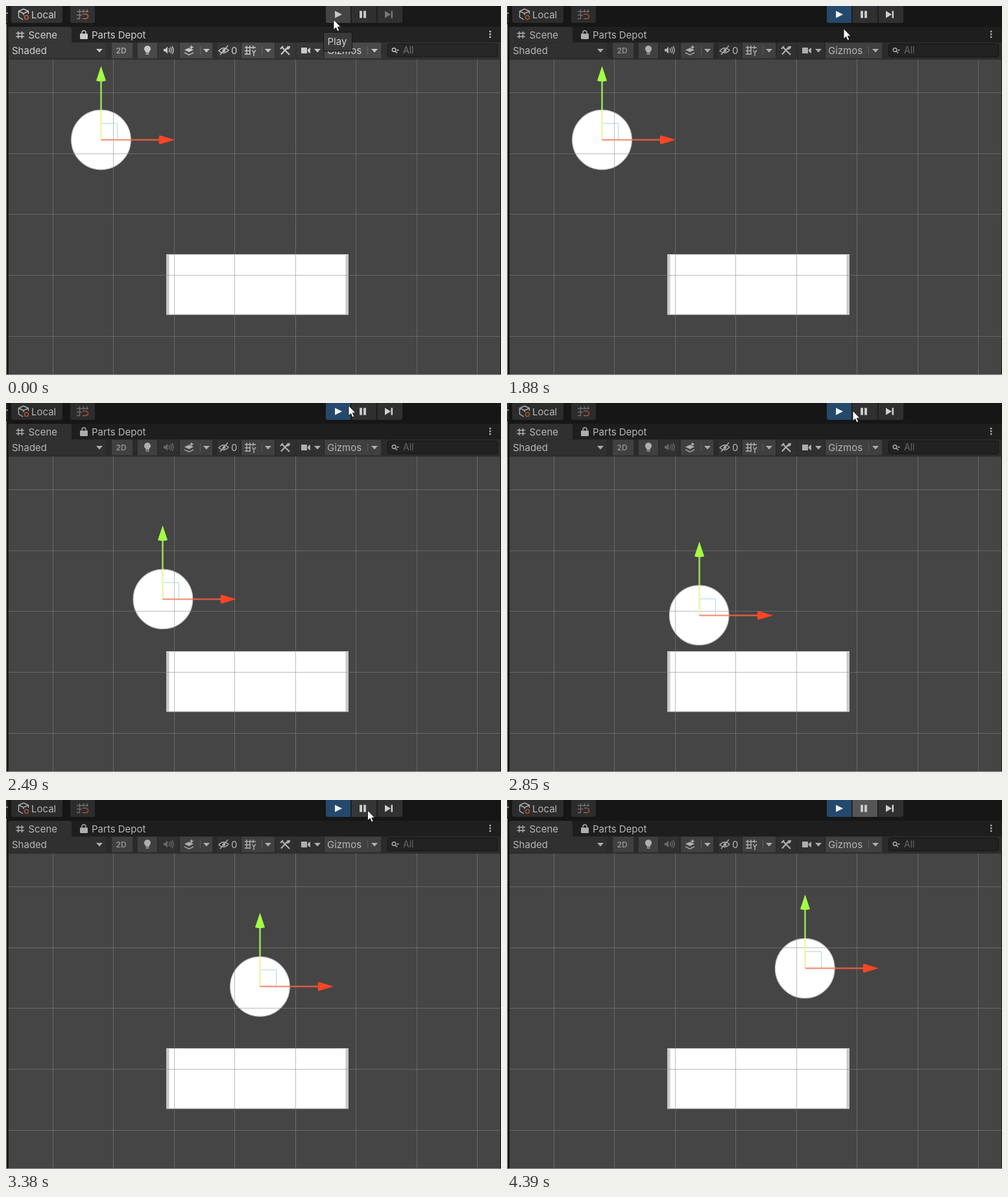
Animation of 763 by 568 pixels, one loop 4850 ms. Source, as an HTML page:

```html
<!DOCTYPE html>
<html lang="en">
<head>
<meta charset="utf-8">
<title>Bouncing ball in a scene editor</title>
<style>
html, body { margin: 0; width: 100%; height: 100%; overflow: hidden; background: #191919; }
svg { display: block; width: 763px; height: 568px; font: 15px Inter, sans-serif; }
text { fill: #d0d0d0; }
.icon { fill: #c8c8c8; }
.line { fill: none; stroke: #c8c8c8; stroke-width: 1.4; }
.bold { stroke-width: 2.2; }
.orange { fill: none; stroke: #c4603c; stroke-width: 1.5; }
.button { fill: #323232; }
.cells { fill: none; stroke-width: 24; }
.shaft { fill: none; stroke-width: 2.6; }
.grid { fill: none; stroke: #858585; stroke-opacity: .55; }
</style>
</head>
<body>
<svg viewBox="0 0 763 568">
  <rect width="763" height="568" fill="#191919"/>

  <g id="toolbar">
    <path d="M0 0H2V26H0Z" fill="#373737"/>
    <path class="line" d="M0 11h3"/>
    <rect class="button" x="8" y="-5" width="79" height="31" rx="3"/>
    <path class="line" d="M27 4.5L34.5 8V12M27 4.5L19.5 8V17L26 21M19.5 8L27 11.5L34.5 8M27 11.5V14"/>
    <circle class="orange" cx="31.5" cy="17.5" r="3"/>
    <text x="39" y="18.5">Local</text>
    <rect class="button" x="99" y="-5" width="38" height="31" rx="3"/>
    <path class="line" opacity=".5" d="M113.5 5V20M119.5 5V10M125 5V10M109 8.5H127M109 14H117M109 19.5H114"/>
    <path class="orange" d="M118 12.5H123a3.3 3.3 0 0 1 0 7H118"/>
  </g>

  <g id="tabs">
    <rect x="2" y="32" width="761" height="24" fill="#232323"/>
    <path d="M4 56V36Q4 32 8 32H97Q101 32 101 36V56Z" fill="#373737"/>
    <path class="line" d="M19 39V50M24.5 39V50M15.5 42H28M15.5 47H28"/>
    <text x="34.5" y="50">Scene</text>
    <path class="icon" d="M114 42.5H126V49.5Q126 51 124.5 51H115.5Q114 51 114 49.5Z"/>
    <path class="line" d="M117 43V41a3 3 0 0 1 6 0V43"/>
    <text x="132" y="50">Parts Depot</text>
    <path class="icon" d="M745 38h2.5v2.5h-2.5zM745 42.3h2.5v2.5h-2.5zM745 46.6h2.5v2.5h-2.5z"/>
  </g>

  <g id="options">
    <rect x="4" y="56" width="759" height="25.5" fill="#303030"/>
    <path class="cells" stroke="#373737" d="M4 68.5H154M235 68.5H265M326 68.5H361M416 68.5H446M448 68.5H489"/>
    <path class="cells" stroke="#494949" d="M163 68.5H195M203 68.5H233M268 68.5H318M363 68.5H414M491 68.5H578"/>
    <text x="9" y="74">Shaded</text>
    <text x="169.5" y="73" style="font-size:12px;font-weight:600;fill:#a6a6a6">2D</text>
    <path class="icon" d="M218 61a5 5 0 0 1 2.7 9.2V72H215.3V70.2A5 5 0 0 1 218 61ZM215.5 73H220.5V74.5H215.5Z"/>
    <g id="audio">
      <path class="icon" d="M243 66H245.5L249 62.5V73.5L245.5 70H243Z"/>
      <path class="line" d="M251 65q2 3 0 6M253.5 63.5q3 4.5 0 9M256 62q4 6 0 12"/>
    </g>
    <path class="icon" d="M275 67.5L282 64.5L289 67.5L282 71ZM275 71L282 74.5L289 71V72.5L282 76L275 72.5ZM286 60l1 2.5l2.5 1l-2.5 1l-1 2.5l-1-2.5l-2.5-1l2.5-1z"/>
    <path class="line" d="M328 69Q335 61 343 68Q336 76 328 69ZM330 75L342 61"/>
    <circle class="icon" cx="336" cy="68.5" r="2.3"/>
    <text x="347" y="74">0</text>
    <path class="line" d="M371 61V75M376 61V75M381 61V66M368 64H385M368 69H377M368 74H377M379.5 68L382 72L385 68M382 72V77"/>
    <path class="line bold" d="M425 63L437 75M435.5 62L424 74.5M423 66L427 62M433 66Q437 66 437 62"/>
    <path class="icon" d="M455 64H464V73H455ZM465 67L469 64V73L465 70Z"/>
    <text x="495" y="74">Gizmos</text>
    <path class="icon" d="M139 66h10l-5 5.5zM304 66h10l-5 5.5zM399 66h10l-5 5.5zM475 66h10l-5 5.5zM563 66h10l-5 5.5z"/>
    <path d="M299.5 62V75M394.5 62V75M557.5 62V75" stroke="#686868"/>
    <rect x="588.5" y="58.5" width="169" height="19.5" rx="3" fill="#272727" stroke="#161616"/>
    <circle class="line" cx="598" cy="67.5" r="2.8"/>
    <path class="line" d="M600 69.5L603 72.5"/>
    <path class="icon" d="M602 67h4l-2 2.5z"/>
    <text x="612" y="73" style="font-size:14px;fill:#747474">All</text>
  </g>
  <rect id="tint" width="763" height="81.5" opacity=".13"/>

  <g id="transport">
    <path id="play" d="M531 -1V26H496Q493 26 493 23V-1Z"/>
    <rect id="pause" x="532.5" y="-1" width="38.5" height="27"/>
    <path d="M572.5 -1V26H608Q611 26 611 23V-1Z" fill="#303030"/>
    <path id="playIcon" d="M507 7.5L518 13L507 18.5Z"/>
    <path class="icon" d="M545 7.5H549V18.5H545ZM551 7.5H555V18.5H551Z"/>
    <path id="stepIcon" d="M584 7.5L593 13L584 18.5ZM593.5 7.5H596V18.5H593.5Z"/>
  </g>

  <g id="scene">
    <rect x="4" y="81.5" width="758" height="486" fill="#454545"/>
    <path d="M4 82H762" stroke="#292929"/>
    <path d="M.5 28V567.5H763" fill="none" stroke="#999"/>
    <rect x="247" y="382" width="281" height="93.5" fill="#c8c8c8"/>
    <rect x="251.5" y="383" width="272" height="91.5" fill="#fff"/>
    <circle id="ball" r="45.8" fill="#fff" stroke="#c6c6c6" stroke-width="1.2"/>
    <path id="sceneGrid" class="grid"/>
    <g id="gizmo">
      <path d="M0 -25.5H25V0" fill="none" stroke="#a9d9ef"/>
      <path class="shaft" d="M0 0V-46" stroke="#e9f8ad"/>
      <path class="shaft" d="M0 -46V-91" stroke="#98dc55"/>
      <path class="shaft" d="M0 0H46" stroke="#f39a84"/>
      <path class="shaft" d="M46 0H91" stroke="#dc5940"/>
      <path d="M0 -113.5L7.5 -91Q0 -88.5 -7.5 -91Z" fill="#a2ff45"/>
      <path d="M113.5 0L90 -7Q88 0 90 7Z" fill="#ff4524"/>
    </g>
  </g>

  <g id="tooltip">
    <rect x="489.5" y="40.5" width="44" height="29" fill="#3a3a3a" stroke="#151515"/>
    <text x="495.5" y="60">Play</text>
  </g>
  <path id="cursor" d="M0 0V15.5L3.6 12.2L6 17.8L8.6 16.7L6.2 11.2H10.8Z" fill="#fff" stroke="#111" stroke-width=".8"/>
</svg>
<script>
const LOOP = 4850, PLAY = 240, LAUNCH = 1960, BOUNCE = 2736, PAUSE = 3740;
const STEP = 30, CELL = 93.6;
const $ = id => document.getElementById(id);

let grid = '';
for (let x = 72; x < 762; x += 93.5) grid += `M${Math.floor(x) + .5} 82V567`;
for (let y = 133.6; y < 567; y += CELL) grid += `M4 ${Math.floor(y) + .5}H762`;
$('sceneGrid').setAttribute('d', grid);

// Straight 45 degree fall, then a shallow rise after hitting the block.
function ballAt(t) {
  if (t < LAUNCH) return [146.5, 206];
  const s = Math.min(t, PAUSE) - BOUNCE;
  return s < 0 ? [275.3 + .1355 * s, 335.3 + .1355 * s] : [275.3 + .1832 * s, 335.3 - .0758 * s];
}

function cursorAt(t) {
  let x = 505, y = 21;
  const glide = (from, to, dx, dy) => {
    const k = Math.min(1, Math.max(0, (t - from) / (to - from)));
    x += dx * k;
    y += dy * k;
  };
  glide(550, 850, 14, 14);
  glide(LAUNCH, 2400, 9, -31);
  glide(2490, 2850, 5, 8);
  glide(2850, 3000, 24.5, 4);
  glide(3910, 4390, 208, 556);
  return [x, y];
}

const place = (id, [x, y]) => $(id).setAttribute('transform', `translate(${x} ${y})`);
const show = (id, visible) => $(id).setAttribute('visibility', visible ? 'visible' : 'hidden');
const fill = (id, color) => $(id).setAttribute('fill', color);

function draw(t) {
  const playing = t >= PLAY;
  const stepped = Math.floor(t / STEP) * STEP + (t > 3000 ? 10 : 0);
  const [x, y] = ballAt(stepped);
  place('ball', [x, y]);
  place('gizmo', [Math.floor(x) + .5, Math.round(y)]);
  place('cursor', cursorAt(stepped));
  show('cursor', t < 4390);
  show('tooltip', t < 120);
  show('tint', playing);
  fill('play', playing ? '#24496c' : '#444');
  fill('playIcon', playing ? '#f2f2f2' : '#c8c8c8');
  fill('pause', t >= 3500 ? '#555' : t >= 2940 ? '#363636' : '#303030');
  fill('stepIcon', t >= 1880 ? '#d0d0d0' : '#777');
  $('audio').setAttribute('opacity', t >= LAUNCH ? .45 : 1);
}

const start = performance.now();
function frame() {
  draw((performance.now() - start) % LOOP);
  requestAnimationFrame(frame);
}
draw(0);
requestAnimationFrame(frame);
</script>
</body>
</html>
```
